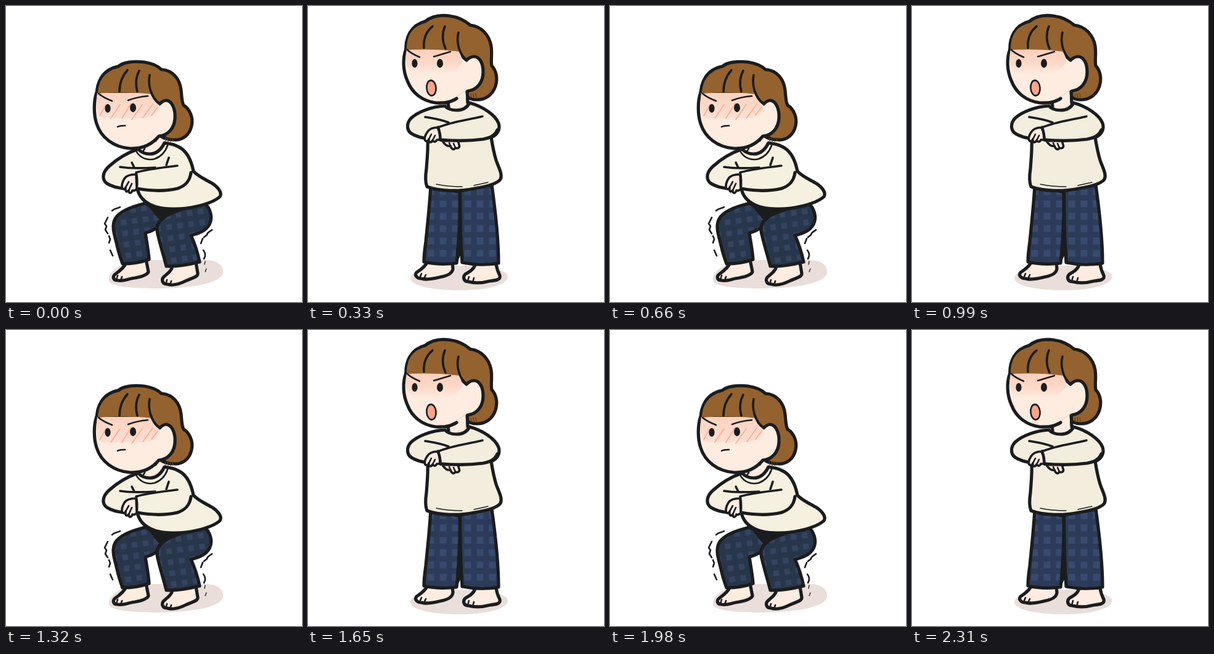
Animation, 480 px wide and 480 px high, one loop 2.64 s. Source, as an HTML page without scripts:

```html
<!DOCTYPE html>
<html lang="en">
<head>
<meta charset="utf-8">
<title>Squats</title>
<style>
html, body { margin: 0; width: 100%; height: 100%; overflow: hidden; background: #fff; }
svg { display: block; width: 100vw; height: 100vh; }
.pose { animation: swap 660ms step-end infinite; }
.stand { animation-name: swap-late; }
@keyframes swap { 0% { visibility: visible; } 50%, 100% { visibility: hidden; } }
@keyframes swap-late { 0% { visibility: hidden; } 50%, 100% { visibility: visible; } }
path, ellipse { stroke-linecap: round; stroke-linejoin: round; }
.ink { stroke: #1b1c1d; stroke-width: 5.2; fill: none; }
.mid { stroke-width: 3.6; }
.thin { stroke-width: 2.6; }
.fine { stroke-width: 1.3; }
.hair { fill: #94622e; }
.skin { fill: #feece1; }
.knit { fill: #f6f0e0; }
.stand .knit { fill: #f2eddd; }
.dark { fill: #1b1c1d; }
.shade { fill: #e9deda; }
.squat .pants { fill: url(#plaid-bent); }
.stand .pants { fill: url(#plaid); }
.flush { fill: none; stroke: #f7b09a; stroke-width: 1.8; }
.strand { fill: none; stroke: #5b3b1b; stroke-width: 1.2; }
</style>
</head>
<body>
<svg viewBox="0 0 480 480">
  <defs>
    <pattern id="plaid" width="20" height="20" patternUnits="userSpaceOnUse" x="4" y="6">
      <rect width="20" height="20" fill="#384a6d"/>
      <path d="M0 5H20M5 0V20" stroke="#1e2c45" stroke-width="9" stroke-opacity=".5"/>
    </pattern>
    <pattern id="plaid-bent" width="18" height="18" patternUnits="userSpaceOnUse" patternTransform="rotate(-8)">
      <rect width="18" height="18" fill="#35445f"/>
      <path d="M0 5H18M5 0V18" stroke="#1c2739" stroke-width="9" stroke-opacity=".5"/>
    </pattern>
    <linearGradient id="blush" x2="0" y2="1">
      <stop offset="0" stop-color="#fcd2bf"/>
      <stop offset="1" stop-color="#fedfd1"/>
    </linearGradient>
    <linearGradient id="blush-soft" x2="0" y2="1">
      <stop offset="0" stop-color="#fcd0bb"/>
      <stop offset=".6" stop-color="#fcd9c8"/>
      <stop offset="1" stop-color="#feece1"/>
    </linearGradient>
  </defs>

  <g class="pose squat">
    <path class="shade" d="M167 444C167 428 190 412 232 412H325C343 412 353 421 352 432C350 450 300 458 245 458C204 458 166 455 167 444Z"/>

    <path class="ink skin" d="M195 416C192 424 184 430 177 435C172 439 174 445 181 445C190 447 199 442 209 441C220 439 229 436 231 431L227 411Z"/>
    <path class="ink thin" d="M181 437L179 444M188 439L186 445"/>
    <path class="ink skin" d="M270 422C269 429 262 434 256 439C251 444 254 451 261 451C270 454 281 451 291 446C301 441 311 440 311 434L308 416Z"/>
    <path class="ink thin" d="M261 444L259 451M268 446L266 452"/>

    <path class="dark" d="M222 317L285 326L264 342L246 362L229 366Z"/>
    <path class="ink pants" d="M226 320C205 325 184 332 177 345C170 358 177 374 180 388C183 402 186 410 189 418C204 418 218 416 232 411C231 396 228 382 226 368C233 366 239 364 244 360C247 350 253 344 258 340L244 330Z"/>
    <path class="ink pants" d="M321 319C331 327 336 342 330 354C324 365 312 369 300 372C306 385 311 401 314 415C298 419 278 423 260 422C256 406 251 391 247 374C242 359 246 350 256 343C263 337 272 334 282 331L300 322Z"/>
    <path class="ink dark" d="M232 322L275 328C264 331 254 336 249 343Z"/>

    <path class="skin" d="M222 222L258 210L258 226L238 242L219 234Z"/>
    <path class="ink knit" d="M214 232C197 238 179 249 167 260C157 269 154 281 164 288C172 293 182 295 191 296L213 296C215 307 222 316 234 322C252 331 285 331 309 325C326 321 341 315 347 309C351 303 344 294 335 288C323 281 311 276 304 268C301 253 295 235 279 228C272 224 264 223 257 222C252 232 244 240 233 240C225 240 219 237 214 232Z"/>
    <path class="ink thin" d="M211 235C217 247 230 251 241 248C252 244 259 235 262 226"/>
    <path class="ink mid" d="M185 261C203 264 224 263 242 262M204 254L208 262M260 258L264 246"/>
    <path class="knit" d="M211 270C231 266 255 263 278 259L300 270C298 286 290 293 277 297C256 301 235 300 214 296Z"/>
    <path class="ink mid" d="M211 270C231 264 255 262 278 259M211 270C213 278 213 288 212 297"/>
    <path class="ink" d="M300 270C298 285 290 292 278 296C256 301 235 300 213 296"/>
    <path class="ink mid skin" d="M211 273C203 273 195 275 192 280C188 286 187 293 189 296C191 298 194 296 194 294C193 300 195 303 199 299C199 304 203 305 205 299C207 300 211 299 212 296Z"/>
    <path class="ink thin" d="M194 294L199 285M199 299L204 288"/>

    <path class="ink hair" d="M147 146C147 124 156 103 182 98C190 91 207 89 224 91C237 93 246 97 252 103C270 104 282 118 284 137C285 147 285 156 288 161C298 167 304 181 301 194C298 209 286 218 273 217C264 217 255 214 249 210L180 190Z"/>
    <path class="ink skin" d="M147 140C142 154 142 176 147 191C154 213 174 229 201 231C222 232 237 224 248 211C262 210 273 199 274 182C275 167 269 154 260 153C255 153 252 156 249 159C241 154 236 145 234 138Z"/>
    <path fill="url(#blush)" d="M148 141H236C239 149 243 155 249 160C247 174 240 181 222 182H158C147 180 145 160 148 141Z"/>
    <path class="hair" d="M149 142C150 122 158 107 182 101L230 98L234 112C231 124 233 133 237 143C210 140 178 140 149 142Z"/>
    <path class="ink mid" d="M197 104C188 114 184 126 184 139M216 105C210 116 210 128 213 139M233 112C230 126 234 148 249 159"/>
    <path class="ink thin" d="M245 213L243 219M258 208L258 216M225 231L222 236"/>
    <path class="strand" d="M258 213L259 219M262 213L263 220M266 214L267 220M270 215L271 219"/>
    <path class="flush" d="M152 178L162 160M170 182L185 160M188 182L203 158M204 184L221 160M222 181L238 159M236 177L246 164"/>
    <ellipse class="dark" cx="165" cy="166" rx="4.6" ry="7"/>
    <ellipse class="dark" cx="206" cy="165" rx="5" ry="7.2"/>
    <path class="ink thin" d="M150 142C156 147 164 151 172 154M198 153C208 149 219 147 230 146M181 196C184 194 189 194 193 194"/>

    <path class="ink thin" d="M185 326C181 329 177 327 172 332M165 343L160 353L163 357L161 363L165 369M167 373L169 378L167 384M169 396L173 405M334 363C329 367 326 367 326 371L321 375M319 377L316 385M320 396C324 401 324 405 321 410"/>
    <path class="ink fine" d="M323 414L322 419M325 426L323 431"/>
  </g>

  <g class="pose stand">
    <path class="shade" d="M166 441C167 429 199 421 245 421C290 421 324 427 324 439C324 452 291 461 246 461C202 461 166 454 166 441Z"/>

    <path class="ink skin" d="M193 416C189 424 182 428 176 432C172 437 177 442 184 442C194 445 207 441 217 439C227 437 234 433 235 426L234 415Z"/>
    <path class="ink thin" d="M184 434L181 441M191 436L188 442"/>
    <path class="ink skin" d="M271 419C269 427 262 431 255 435C250 440 253 447 260 447C271 450 284 449 295 446C305 445 313 444 311 437C308 431 306 426 305 418Z"/>
    <path class="ink thin" d="M261 439L259 446M269 441L267 448"/>

    <path class="ink pants" d="M199 292C197 326 194 352 191 382C189 396 188 406 188 415C206 419 224 419 241 417C244 390 246 350 247 302Z"/>
    <path class="ink pants" d="M246 300C246 342 248 384 250 416C270 420 291 420 309 417C309 384 305 340 298 290Z"/>
    <path class="dark" d="M244 300H249L250 380L247 405L242 415C245 380 245 340 244 300Z"/>

    <path class="skin" d="M227 148L258 137L260 160L243 169L226 165Z"/>
    <path class="ink" d="M227 156L228 164M258 140L259 157"/>
    <path class="ink knit" d="M222 162C200 163 178 172 167 182C159 191 160 202 168 207C176 212 185 214 194 215C195 233 193 249 192 264C190 277 190 286 193 293C213 301 246 301 270 296C289 293 307 288 312 281C316 273 309 262 305 250C301 237 299 225 297 213C308 209 312 199 309 190C304 177 284 163 262 157C258 165 250 169 241 169C233 169 226 167 222 162Z"/>
    <path class="ink mid" d="M190 180C202 182 216 184 228 189"/>
    <path class="ink mid skin" d="M218 219C222 225 227 228 231 227C233 233 237 234 239 230C243 232 247 229 245 225L243 218Z"/>
    <path class="ink thin" d="M231 227L229 222M239 230L236 223"/>
    <path class="knit" d="M211 196C232 188 258 184 283 179L307 192C308 205 303 212 291 215C266 220 239 219 215 217Z"/>
    <path class="ink" d="M307 201C303 211 294 214 284 216C262 219 238 219 215 217"/>
    <path class="ink mid" d="M211 197C232 188 258 185 283 179M211 196C214 203 215 210 215 218"/>
    <path class="ink mid skin" d="M210 197C202 197 196 200 193 205C189 211 188 217 191 219C193 220 195 218 196 216C195 221 199 223 202 218C204 221 207 221 209 217L214 217C214 210 213 203 210 197Z"/>
    <path class="ink thin" d="M196 216L200 208M202 218L206 210"/>
    <path class="ink fine" d="M208 289C222 292 237 293 250 293M269 291L292 286"/>

    <path class="ink hair" d="M159 76C157 51 167 31 190 25C200 17 214 14 229 16C244 18 255 24 263 31C281 33 294 47 297 65C299 78 296 88 298 97C305 104 308 117 304 130C299 145 287 152 274 152C267 152 262 151 258 147L190 120Z"/>
    <path class="ink skin" d="M159 70C153 85 154 105 161 121C169 142 186 154 207 157C222 158 234 155 242 149L259 138C274 136 284 124 284 107C284 92 278 82 269 82C264 82 260 85 257 88C250 83 246 76 243 69Z"/>
    <path class="skin" d="M228 148L240 147L257 136L256 150L240 158L229 156Z"/>
    <path class="ink" d="M258 139L259 150M241 150C235 154 230 155 224 157"/>
    <path fill="url(#blush-soft)" d="M160 70H244C246 78 251 84 250 91C242 105 232 109 214 110H177C162 109 155 94 160 70Z"/>
    <path class="hair" d="M160 71C160 49 168 33 190 28L238 23L244 45C241 55 243 63 246 74C218 70 187 70 160 71Z"/>
    <path class="ink mid" d="M202 33C191 42 187 55 188 68M222 33C217 45 218 58 223 69M244 43C240 58 245 78 257 88"/>
    <path class="strand" d="M264 143L265 149M268 142L269 149M272 142L273 148"/>
    <ellipse class="dark" cx="173" cy="93" rx="4.6" ry="7"/>
    <ellipse class="dark" cx="214" cy="93" rx="5" ry="7.2"/>
    <path class="ink thin" d="M161 71C167 77 174 80 181 83M204 82C212 80 221 77 231 74"/>
    <ellipse class="ink thin" cx="200" cy="133" rx="7.6" ry="12.4" fill="#f5a58b" style="fill:#f5a58b" transform="rotate(-5 200 133)"/>
  </g>
</svg>
</body>
</html>
```
